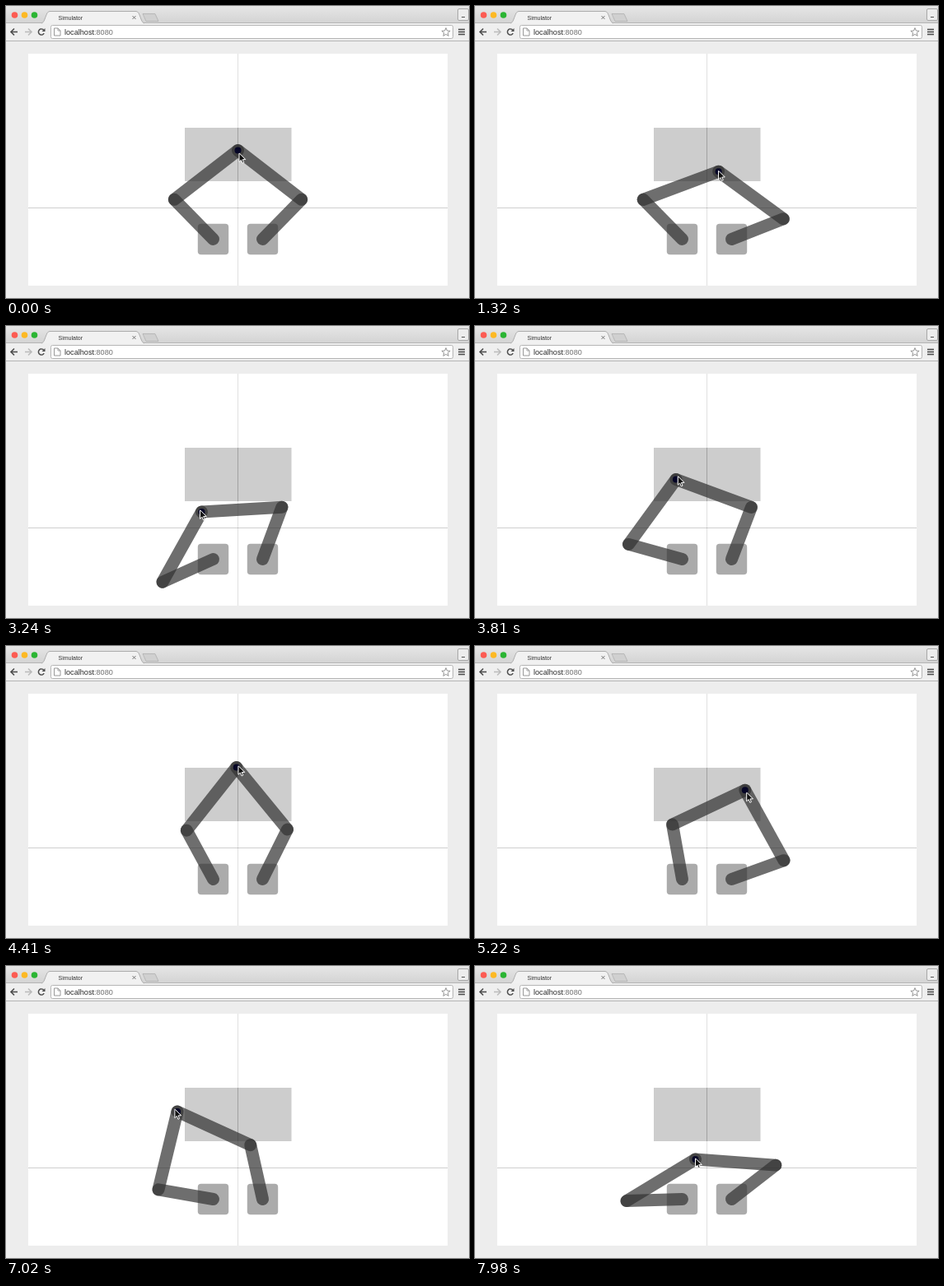
Animation, 562 px wide and 355 px high, one loop 8000 ms. Source, as an HTML page with a canvas:

```html
<!DOCTYPE html>
<html>
<head>
<meta charset="utf-8">
<title>Simulator</title>
<style>
html, body { margin: 0; width: 100%; height: 100%; overflow: hidden; background: #ededed; }
canvas { display: block; width: 562px; height: 355px; }
</style>
</head>
<body>
<canvas id="view" width="562" height="355"></canvas>
<script>
const canvas = document.getElementById('view');
const ctx = canvas.getContext('2d');

const LOOP = 8000, STEP = 30;
const CRANK = 67.5, ROD = 97.6;
const LEFT = [251.5, 283.5], RIGHT = [311.5, 283.5];
const LAG = 45; // ms by which the arm trails the pointer

// time, position, velocity (px per ms)
const keys = [
  [0, 281.5, 175.5, 0.033, 0.08],
  [2280, 296, 193, 0.008, 0.012],
  [3240, 237.5, 226, -0.045, -0.045],
  [4410, 279.7, 147.5, 0.05, -0.035],
  [6030, 305, 205, -0.125, -0.03],
  [7020, 208, 177, -0.07, -0.06],
  [7980, 267.5, 235, 0, -0.02]
];

function rect(x, y, w, h, fill) {
  ctx.fillStyle = fill;
  ctx.fillRect(x, y, w, h);
}

function rounded(x, y, w, h, r, fill, stroke) {
  ctx.beginPath();
  ctx.roundRect(x, y, w, h, r);
  ctx.fillStyle = fill;
  ctx.fill();
  if (stroke) {
    ctx.strokeStyle = stroke;
    ctx.lineWidth = 1;
    ctx.stroke();
  }
}

function disc(x, y, r, fill) {
  ctx.beginPath();
  ctx.arc(x, y, r, 0, Math.PI * 2);
  ctx.fillStyle = fill;
  ctx.fill();
}

function trace(points, close) {
  ctx.beginPath();
  points.forEach(([x, y]) => ctx.lineTo(x, y));
  if (close) ctx.closePath();
}

function line(points, color, width, cap = 'butt') {
  trace(points);
  ctx.strokeStyle = color;
  ctx.lineWidth = width;
  ctx.lineCap = cap;
  ctx.stroke();
}

function shape(points, fill, stroke, width = 1) {
  trace(points, true);
  ctx.fillStyle = fill;
  ctx.fill();
  if (stroke) {
    ctx.strokeStyle = stroke;
    ctx.lineWidth = width;
    ctx.stroke();
  }
}

function text(str, x, y, size, color) {
  ctx.font = `${size}px "Liberation Sans", Arial, sans-serif`;
  ctx.fillStyle = color;
  ctx.fillText(str, x, y);
  return x + ctx.measureText(str).width;
}

function hermite(p, q, m, n, u) {
  const u2 = u * u, u3 = u2 * u;
  return (2 * u3 - 3 * u2 + 1) * p + (u3 - 2 * u2 + u) * m
    + (3 * u2 - 2 * u3) * q + (u3 - u2) * n;
}

function slope(p, q, m, n, u) {
  const u2 = u * u;
  return 6 * (u2 - u) * (p - q) + (3 * u2 - 4 * u + 1) * m + (3 * u2 - 2 * u) * n;
}

function poseAt(t) {
  let i = 0;
  while (i < keys.length - 2 && t >= keys[i + 1][0]) i++;
  const a = keys[i], b = keys[i + 1];
  const span = b[0] - a[0];
  const u = Math.min(1, (t - a[0]) / span);
  const axis = k => [a[k], b[k], a[k + 2] * span, b[k + 2] * span, u];
  const tip = [hermite(...axis(1)), hermite(...axis(2))];
  const pointer = tip.map((v, k) => v + LAG * slope(...axis(k + 1)) / span);
  return { tip, pointer };
}

function elbow(base, tip, side) {
  const dx = tip[0] - base[0], dy = tip[1] - base[1];
  const d = Math.hypot(dx, dy);
  const c = (CRANK * CRANK + d * d - ROD * ROD) / (2 * CRANK * d);
  const angle = Math.atan2(dy, dx) + side * Math.acos(Math.max(-1, Math.min(1, c)));
  return [base[0] + CRANK * Math.cos(angle), base[1] + CRANK * Math.sin(angle)];
}

function drawTabs() {
  const bar = ctx.createLinearGradient(0, 0, 0, 21);
  bar.addColorStop(0, '#e6e6e6');
  bar.addColorStop(1, '#d3d3d3');
  rect(0, 0, 562, 21, bar);
  disc(10.5, 11, 3.8, '#fc5b52');
  disc(22.5, 11, 3.8, '#fdb924');
  disc(34.5, 11, 3.8, '#2bb533');
  line([[0, 20.5], [562, 20.5]], '#b4b4b4', 1);
  rect(0, 21, 562, 22, '#efefef');

  ctx.beginPath();
  ctx.moveTo(43, 21);
  ctx.bezierCurveTo(48, 20, 48, 6.5, 53, 6.5);
  ctx.lineTo(158, 6.5);
  ctx.bezierCurveTo(163, 6.5, 163, 20, 168, 21);
  ctx.fillStyle = '#f1f1f1';
  ctx.fill();
  ctx.strokeStyle = '#adadad';
  ctx.lineWidth = 1;
  ctx.stroke();
  text('Simulator', 63.5, 16.5, 7, '#333');
  line([[153.5, 12], [157.5, 16]], '#777', 1);
  line([[157.5, 12], [153.5, 16]], '#777', 1);

  shape([[166, 9.5], [181, 9.5], [185, 18.5], [170, 18.5]], '#d0d0d0', '#b0b0b0', 0.8);
  rounded(548.5, 3.5, 13, 14, 1.5, '#ededed', '#a8a8a8');
  line([[553, 13.5], [557, 13.5]], '#555', 1);
}

function drawArrow(x, dir, color) {
  line([[x - 4 * dir, 31.5], [x + 4 * dir, 31.5]], color, 1.6);
  line([[x, 27.5], [x + 4 * dir, 31.5], [x, 35.5]], color, 1.6);
}

function drawToolbar() {
  drawArrow(10, -1, '#4d4d4d');
  drawArrow(27, 1, '#bcbcbc');
  ctx.beginPath();
  ctx.arc(43, 31.5, 3.6, 0.5, 5.5);
  ctx.strokeStyle = '#4d4d4d';
  ctx.lineWidth = 1.5;
  ctx.stroke();
  shape([[47.5, 27], [47.5, 31], [43.5, 31]], '#4d4d4d');

  rounded(54.5, 23.5, 488, 16, 2, '#fff', '#b5b5b5');
  shape([[58.5, 27], [63, 27], [66, 30], [66, 36], [58.5, 36]], '#fff', '#8e8e8e', 0.9);
  line([[63, 27], [63, 30], [66, 30]], '#8e8e8e', 0.8);
  const end = text('localhost', 71, 34.7, 9.15, '#2a2a2a');
  text(':8080', end, 34.7, 9.15, '#707070');

  const star = Array.from({ length: 10 }, (_, i) => {
    const r = i % 2 ? 2.4 : 5.4, a = i * Math.PI / 5 - Math.PI / 2;
    return [534 + r * Math.cos(a), 32 + r * Math.sin(a)];
  });
  shape(star, '#fff', '#888', 0.9);
  for (const y of [28.5, 31.5, 34.5]) line([[549, y], [557, y]], '#4d4d4d', 1.6);
  line([[0, 42.5], [562, 42.5]], '#b5b5b5', 1);
}

function drawField() {
  rect(0, 43, 562, 312, '#ededed');
  rect(27, 58, 509, 282, '#fff');
  rect(217, 148, 129.5, 65, '#cdcdcd');
  rect(281, 58, 1, 282, 'rgba(0,0,0,.12)');
  rect(281, 148, 1, 65, 'rgba(0,0,0,.1)');
  rect(27, 245, 509, 1, 'rgba(0,0,0,.19)');
  for (const [x, y] of [LEFT, RIGHT]) {
    rounded(x - 18.7, y - 18.7, 37.4, 37.4, 4, '#ababab');
  }
}

function drawArms(tip) {
  const color = 'rgba(49,49,49,.7)';
  const l = elbow(LEFT, tip, -1), r = elbow(RIGHT, tip, 1);
  for (const bar of [[LEFT, l], [RIGHT, r], [l, tip], [r, tip]]) {
    line(bar, color, 15, 'round');
  }
  disc(tip[0], tip[1], 4, '#060626');
}

function drawPointer([x, y]) {
  const arrow = [[0, 0], [0, 10.4], [2.4, 8.2], [4.1, 12], [5.8, 11.2], [4.2, 7.6], [7.4, 7.5]];
  ctx.lineJoin = 'round';
  shape(arrow.map(p => [x + p[0], y + p[1]]), '#111', '#fff', 1);
  ctx.lineJoin = 'miter';
}

function frame(now) {
  const t = Math.floor((now % LOOP) / STEP) * STEP;
  const { tip, pointer } = poseAt(t);
  drawTabs();
  drawToolbar();
  drawField();
  drawArms(tip);
  drawPointer(pointer);
}

const start = performance.now();
function tick() {
  frame(performance.now() - start);
  requestAnimationFrame(tick);
}
tick();
</script>
</body>
</html>
```
